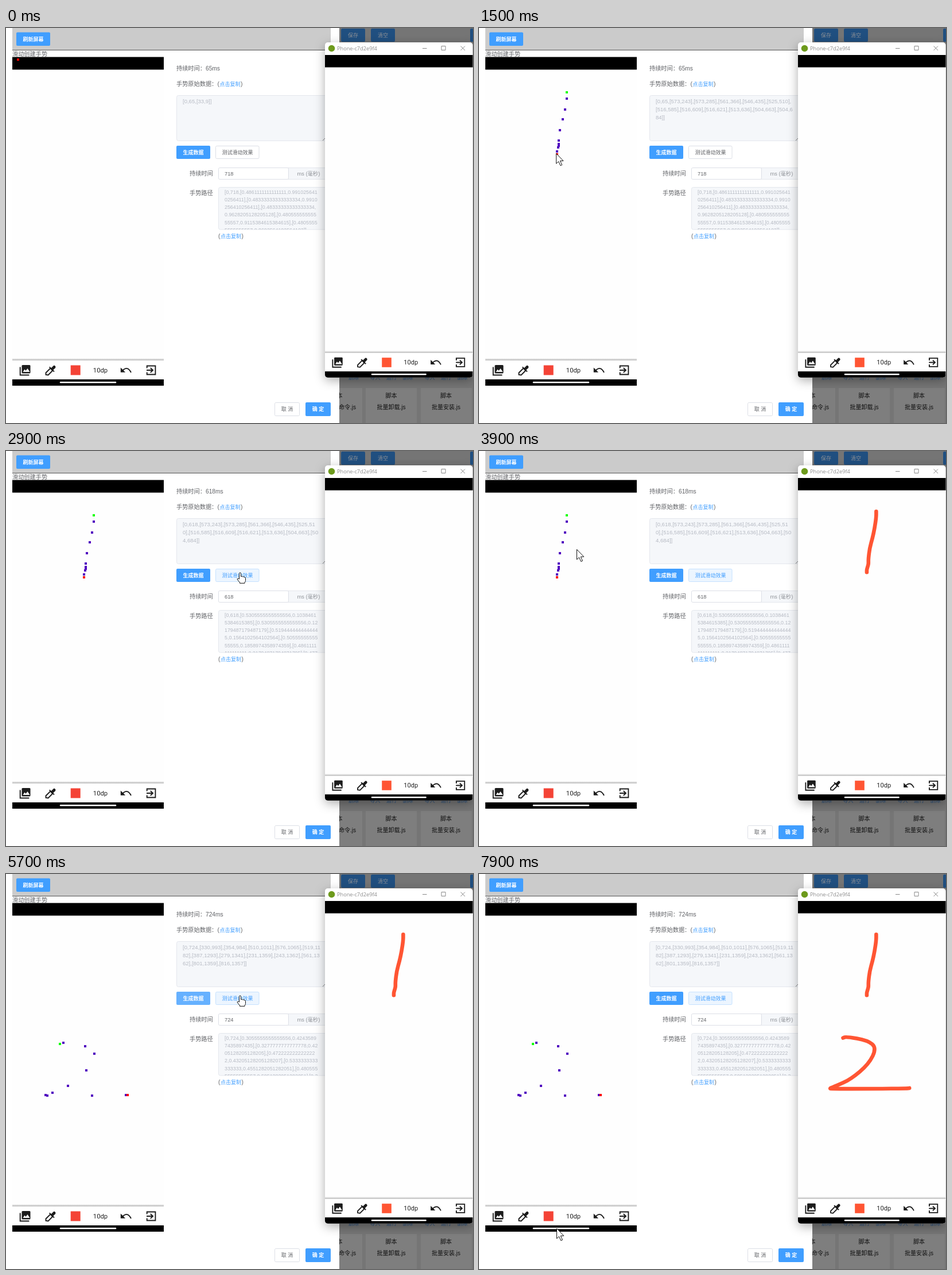
These frames come from a looping animation (814x688 px, 8 s). An HTML page:

```html
<!DOCTYPE html>
<html lang="zh-CN">
<head>
<meta charset="utf-8">
<style>
html, body { margin: 0; width: 100%; height: 100%; overflow: hidden; background: #fff; }
svg { display: block; font: 10.2px "Liberation Sans", "Noto Sans CJK SC", "Noto Sans CJK", sans-serif; fill: #606266; }
.btn { font-size: 9px; text-anchor: middle; }
.white { fill: #fff; font-weight: bold; }
.blue { fill: #409eff; }
.link { fill: #409eff; font-size: 9px; }
.box { fill: #fff; stroke: #dcdfe6; }
.off { fill: #f5f7fa; stroke: #e4e7ed; }
.dim { fill: #204f80; }
.foot { fill: #284f7c; word-spacing: 8px; }
.card { fill: #111; font-size: 10px; text-anchor: middle; }
.line { fill: none; stroke: #1c1c1c; stroke-width: 1.9; }
.data { color: #b6bac3; word-break: break-all; }
#raw { font-size: 9.55px; line-height: 14.2px; width: 240.9px; }
#path { font-size: 8.85px; line-height: 13.15px; width: 163.6px; }
#test.plain rect { fill: #fff; stroke: #dcdfe6; }
#test.gray rect { fill: #f7f8f9; stroke: #dcdfe6; }
#test.active rect { fill: #ecf5ff; stroke: #c6e2ff; }
#test.active text { fill: #409eff; }
#ink path { fill: none; stroke: #ff5533; stroke-width: 6.6; stroke-linecap: round; stroke-linejoin: round; }
#arrow, #hand { fill: #fff; stroke: #111; }
</style>
</head>
<body>
<svg width="814" height="688" viewBox="0 0 814 688">
  <defs>
    <linearGradient id="fade" x2="0" y2="1"><stop stop-color="#fff"/><stop offset="1" stop-color="#b4b4b4"/></linearGradient>
    <filter id="shadow" x="-20%" y="-20%" width="140%" height="140%"><feDropShadow dx="0" dy="5" stdDeviation="9" flood-opacity=".32"/></filter>
    <clipPath id="window"><rect x="556" y="25" width="257.5" height="584" rx="5"/></clipPath>
    <g id="toolbar">
      <rect y="-21" width="264" height="4" fill="url(#fade)"/>
      <rect y="-17" width="264" height="34" fill="#fff"/>
      <rect y="16" width="264" height="11" fill="#000"/>
      <path d="M84 21.3h96" stroke="#fff" stroke-width="2.4" stroke-linecap="round"/>
      <rect x="101.7" y="-8.5" width="17" height="17" fill="currentColor"/>
      <text x="153.5" y="4" text-anchor="middle" font-family="Roboto, sans-serif" font-size="11.3" fill="#222">10dp</text>
      <g id="photos"><rect x="16.500" y="-9" width="15" height="14.500" rx="1.500" fill="#1c1c1c"/><path d="M18.500 3l3-4.500 2 2.500 3-4 4 6z" fill="#fff"/><path class="line" d="M13.700-5.500v14h15.700"/></g>
      <g id="dropper" class="line"><path d="M58.500 8V4.500l8-8 4 4-8 8z"/><path d="M64.700-5.600l8.300 8.300"/><path d="M69.500-2l3.500-3.500" stroke-width="5" stroke-linecap="round"/></g>
      <g id="undo"><path class="line" d="M192.500.2Q201-8 207 4"/><path d="M188.800-4.600v8.300h8.300z" fill="#1c1c1c"/></g>
      <path id="exit" class="line" d="M234.700-3.500v-4h14.700v15h-14.700v-4M234 0h10.500m-3.700-4l4.200 4-4.200 4"/>
    </g>
  </defs>

  <!-- dialog -->
  <rect width="581" height="688" fill="#fff"/>
  <rect x="11" width="555" height="38" fill="#cbcbcb"/>
  <rect x="11" y="38" width="555" height="1" fill="#555"/>
  <rect class="blue" x="18" y="7.500" width="59" height="23.500" rx="2"/>
  <text class="btn white" x="47.500" y="22.500">刷新屏幕</text>
  <text x="11" y="48.500">滑动创建手势</text>
  <rect x="11" y="51" width="264" height="550" fill="#fefefe"/>
  <rect x="11" y="50.500" width="264" height="22" fill="#000"/>
  <use href="#toolbar" x="11" y="596" color="#f44336"/>
  <g id="dots"></g>

  <text x="297" y="73.500">持续时间：<tspan id="time" x="348"></tspan></text>
  <text x="297" y="101">手势原始数据：<tspan x="368.500">(</tspan><tspan class="link" x="372.500">点击复制</tspan><tspan x="409">)</tspan></text>
  <rect class="off" x="297.500" y="117.500" width="269" height="79" rx="3"/>
  <path d="M552 196l4-4" stroke="#888"/>
  <foreignObject x="308" y="121" width="246" height="74"><div id="raw" class="data"></div></foreignObject>
  <rect id="make" x="297" y="205" width="59" height="23" rx="2"/>
  <text class="btn white" x="326.500" y="219.500">生成数据</text>
  <g id="test"><rect x="365.500" y="205.500" width="75.500" height="22" rx="2"/><text class="btn" x="403.500" y="219.500">测试滑动效果</text></g>
  <text x="320" y="257">持续时间</text>
  <rect class="off" x="480.500" y="243.500" width="86" height="20"/>
  <rect class="box" x="370.500" y="243.500" width="122" height="20" rx="2"/>
  <text id="length" x="381" y="256.500" font-size="9.3"></text>
  <text x="507.500" y="257" font-size="9.3" fill="#909399">ms (毫秒)</text>
  <text x="320" y="291">手势路径</text>
  <rect class="off" x="370.500" y="277.500" width="196" height="73.500" rx="3"/>
  <foreignObject x="381" y="280" width="174" height="71"><div id="path" class="data"></div></foreignObject>
  <text x="370" y="365.500">(<tspan class="link" x="374">点击复制</tspan><tspan x="410.500">)</tspan></text>
  <rect class="box" x="468.500" y="652.500" width="43" height="23" rx="2"/>
  <text class="btn" x="490" y="667">取 消</text>
  <rect class="blue" x="522" y="652" width="44" height="24" rx="2"/>
  <text class="btn white" x="544" y="667">确 定</text>

  <!-- dimmed page -->
  <svg x="581" width="233" height="688" viewBox="581 0 233 688">
    <rect x="581" width="233" height="688" fill="#757575"/>
    <g class="dim"><rect x="584" y="1" width="42" height="23" rx="2"/><rect x="636" y="1" width="42" height="23" rx="2"/><rect x="809" y="1" width="6" height="23" rx="2"/></g>
    <g class="btn" fill="#8a8f96"><text x="605" y="16">保存</text><text x="657" y="16">清空</text></g>
    <g fill="#7e7e7e"><rect x="581" y="627" width="40" height="61"/><rect x="627" y="627" width="89" height="61"/><rect x="723" y="627" width="89" height="61"/></g>
    <g class="btn foot"><text x="606" y="612">删除</text><text x="672" y="612">导入 运行 删除</text><text x="767" y="612">导入 运行 删除</text></g>
    <g class="card">
      <text x="671.500" y="644">脚本</text><text x="671.500" y="663.500">批量卸载.js</text>
      <text x="767" y="644">脚本</text><text x="767" y="663.500">批量安装.js</text>
      <text x="576.500" y="644">脚本</text><text x="585" y="663.500">批量命令.js</text>
    </g>
  </svg>

  <!-- phone window -->
  <rect x="556" y="25" width="257.500" height="584" rx="5" fill="#fff" filter="url(#shadow)"/>
  <g clip-path="url(#window)">
    <circle cx="567.500" cy="35.500" r="5.800" fill="#6d9a1c"/>
    <text x="577" y="39" font-family="Open Sans, sans-serif" font-size="9.2" fill="#8c8c8c">Phone-c7d2e9f4</text>
    <path d="M726 35.500h7.500M759 31.500h7v7h-7zM792.500 31.500l7.500 7.500m0-7.500l-7.500 7.500" fill="none" stroke="#888"/>
    <rect x="556" y="68" width="258" height="500" fill="#fefefe"/>
    <rect x="556" y="47" width="258" height="21.500" fill="#000"/>
    <use href="#toolbar" transform="translate(556 582.5) scale(.9755)" color="#ff5533"/>
    <g id="ink"><path pathLength="1"/><path pathLength="1"/></g>
  </g>

  <path id="arrow" d="M.5.5V18l4-3.700 3.300 7.200 2.700-1.200-3.200-7.100h5.500z"/>
  <path id="hand" d="M-1.500 11V1.500q0-1.500 1.500-1.500t1.500 1.500v5q2-1 3 .5 2-.7 2.700.7 2.300-.3 2.300 1.800v4q0 2-1.500 3.500v1.300h-8.500v-1.300l-4.100-5q-.8-2 1.100-2z"/>
</svg>
<script>
const $ = id => document.getElementById(id);
const LOOP = 8000, STEP = 100;

// touch points in phone pixels, as the page prints them
const gestures = [
  { start: -1000, span: 65, points: [[33, 9]] },
  { start: 900, span: 618, points: [[573, 243], [573, 285], [561, 366], [546, 435], [525, 510],
    [516, 585], [516, 609], [516, 621], [513, 636], [504, 663], [504, 684]] },
  { start: 4200, span: 724, points: [[330, 993], [354, 984], [510, 1011], [576, 1065], [519, 1182],
    [387, 1293], [279, 1341], [231, 1359], [243, 1362], [561, 1362], [801, 1359], [816, 1357]] },
];
const [, one, two] = gestures;
const firstPath = '[0,718,[0.4861111111111111,0.9910256410256411],[0.48333333333333334,0.9910256410256411],' +
  '[0.48333333333333334,0.9628205128205128],[0.48055555555555557,0.9115384615384615],' +
  '[0.48055555555555557,0.8602564102564103]]';

const dotAt = ([x, y]) => [11 + x * 264 / 1080, 51 + y * 264 / 1080];
const inkAt = ([x, y]) => [556 + x * 257 / 1080, 47 + y * 562 / 2340];
const normalized = ({ span, points }) =>
  JSON.stringify([0, span, ...points.map(([x, y]) => [x / 1080, y / 2340])]);

// pointer legs between gestures and buttons: from, until, target
const makeButton = [315, 218], testButton = [408, 212];
const legs = [
  [100, 800, [150, 110]],
  [1500, 1500, dotAt(one.points.at(-1))],
  [1500, 1900, makeButton],
  [2700, 2900, testButton],
  [3500, 3900, [170, 171]],
  [3900, 4200, dotAt(two.points[0])],
  [5100, 5100, dotAt(two.points.at(-1))],
  [5100, 5400, makeButton],
  [5600, 5700, testButton],
  [5900, 6100, [497, 418]],
  [7200, 7600, [135, 617]],
];

const clamp = k => Math.max(0, Math.min(1, k));
const ease = k => k * k * (3 - 2 * k);
const between = (t, a, b) => t >= a && t <= b;

function pointerAt(t) {
  let pos = [800, 60];
  for (const [from, until, target] of legs) {
    if (t < from) break;
    const k = until > from ? ease(clamp((t - from) / (until - from))) : 1;
    pos = pos.map((v, i) => v + (target[i] - v) * k);
  }
  return pos;
}

// smooth line through the midpoints of the touch points
function inkPath(points) {
  const p = points.map(inkAt);
  let d = 'M' + p[0];
  for (let i = 1; i < p.length; i++)
    d += `Q${p[i - 1]} ${(p[i][0] + p[i - 1][0]) / 2},${(p[i][1] + p[i - 1][1]) / 2}`;
  return d + 'L' + p.at(-1);
}
const ink = [...$('ink').children];
ink.forEach((path, i) => path.setAttribute('d', inkPath(gestures[i + 1].points)));

function drawInk(path, progress) {
  const p = clamp(progress);
  path.style.display = p ? '' : 'none';
  path.setAttribute('stroke-dasharray', p < 1 ? `${p} 2` : 'none');
}

function render(t) {
  const index = gestures.findLastIndex(g => t >= g.start);
  const { start, span, points } = gestures[index];
  const count = 1 + Math.floor((t - start) / span * points.length);
  const shown = points.slice(0, count);
  const time = t >= start + span ? span : gestures[index - 1].span;
  $('time').textContent = time + 'ms';
  $('raw').textContent = JSON.stringify([0, time, ...shown]);
  $('dots').innerHTML = shown.map((p, i) => {
    const [x, y] = dotAt(p).map(Math.round);
    const color = i === shown.length - 1 ? '#f00' : i ? '#5000c0' : '#1f0';
    return `<rect x="${x}" y="${y}" width="4" height="4" fill="${color}"/>`;
  }).join('');

  const made = t < 2600 ? null : t < 5500 ? one : two;
  $('length').textContent = made ? made.span : 718;
  $('path').textContent = made ? normalized(made) : firstPath;

  const onMake = between(t, 1900, 2700) || between(t, 5400, 5700);
  const onTest = between(t, 2900, 3500) || between(t, 5700, 5900);
  const testFocus = between(t, 2900, 4100) || t >= 5700;
  $('make').setAttribute('fill', onMake ? '#66b1ff' : '#409eff');
  $('test').setAttribute('class', testFocus ? 'active' : t > 4100 ? 'gray' : 'plain');
  drawInk(ink[0], (t - 3100) / one.span);
  drawInk(ink[1], (t - 6300) / 500);

  const dragging = between(t, one.start, 1500) || between(t, two.start, 5100);
  const [x, y] = dragging ? dotAt(shown.at(-1)) : pointerAt(t);
  const pointer = onMake || onTest ? 'hand' : 'arrow';
  for (const id of ['arrow', 'hand']) {
    $(id).style.display = t >= 100 && id === pointer ? '' : 'none';
    $(id).setAttribute('transform', `translate(${x} ${y})`);
  }
}

let last = -1;
function frame() {
  const t = Math.floor(performance.now() % LOOP / STEP) * STEP;
  if (t !== last) render(last = t);
  requestAnimationFrame(frame);
}
frame();
</script>
</body>
</html>
```
